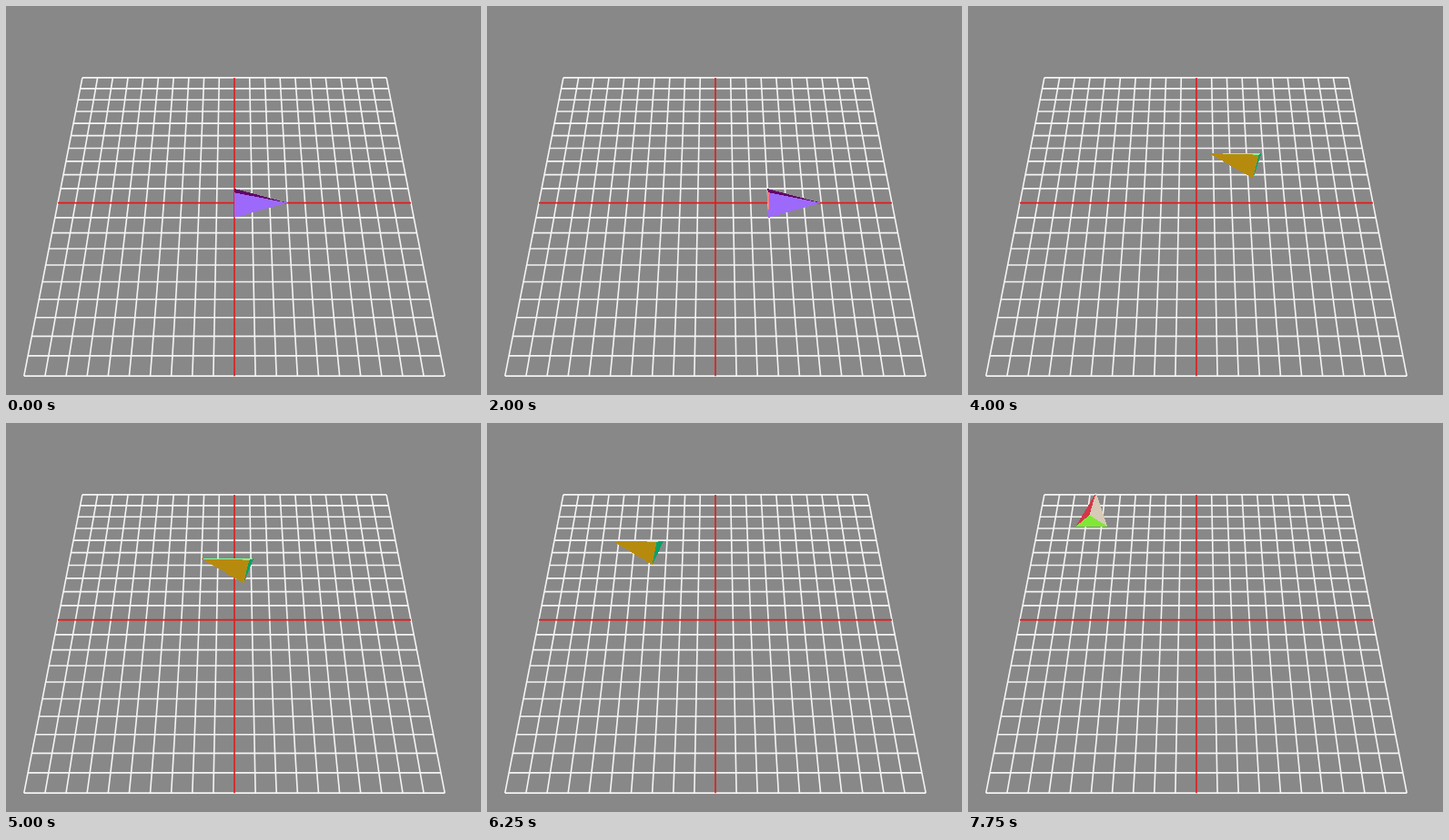
An HTML page that plays this animation: 522x428 px, repeating every 8000 ms.

```html
<!DOCTYPE html>
<html lang="en">
<head>
<meta charset="utf-8">
<title>Arrow on a grid</title>
<style>
  html, body { margin: 0; height: 100%; overflow: hidden; background: #888; }
  svg { display: block; width: 100%; height: 100%; }
  path { fill: none; stroke-width: 1.6; }
  polygon { shape-rendering: crispEdges; }
</style>
</head>
<body>
<svg viewBox="0 0 522 428">
  <path id="grid" stroke="#f4f4f4"/>
  <path id="axes" stroke="#e01c1c"/>
  <g id="arrow"></g>
</svg>
<script>
const LOOP = 8000, STEP = 250, RAD = Math.PI / 180;
const $ = id => document.getElementById(id);

// Camera pitched down at the floor: x right, y up, z towards the viewer.
const SIN = 0.822, COS = 0.57, DIST = 35.4, SCALE = 19.4;
const toView = ([x, y, z]) => [x, y * COS - z * SIN, y * SIN + z * COS];

function project(p) {
  const [x, y, z] = toView(p), k = SCALE / (1 - z / DIST);
  return [251 + x * k, 214 + (0.134 - y) * k];
}

const line = (a, b) => `M${project(a)}L${project(b)}`;
const cross = i => line([i, 0, -10], [i, 0, 10]) + line([-10, 0, i], [10, 0, i]);
let grid = '';
for (let i = -10; i <= 10; i++) if (i) grid += cross(i);
$('grid').setAttribute('d', grid);
$('axes').setAttribute('d', cross(0));

// Steering in degrees per step: left, straight, then right.
const steer = n => n < 7 ? 0 : n < 15 ? 20.25 : n < 26 ? 0 : -18;

// Speeds up on the straight, brakes in the turns.
function poseAt(steps) {
  const parts = 20, dt = 1 / parts;
  let x = 0, z = 0, dir = 0, v = 0;
  for (let i = 0; i < steps * parts; i++) {
    const turn = steer(i / parts) * RAD;
    v = turn ? Math.max(0.48, v - 0.27 * dt) : Math.min(0.92, v + 0.12 * dt);
    const mid = dir + turn * dt / 2;
    x += v * dt * Math.cos(mid);
    z -= v * dt * Math.sin(mid);
    dir += turn * dt;
  }
  return { x, z, dir };
}

// Colour from the face normal as the camera sees it.
function normalColor([a, b, c], sign) {
  const u = b.map((q, i) => q - a[i]), w = c.map((q, i) => q - a[i]);
  const n = [u[1] * w[2] - u[2] * w[1], u[2] * w[0] - u[0] * w[2], u[0] * w[1] - u[1] * w[0]];
  const len = Math.hypot(...n);
  return `rgb(${toView(n).map(q => Math.round(127.5 * (1 + sign * q / len)))})`;
}

const facesCamera = ([a, b, c]) =>
  (b[0] - a[0]) * (c[1] - a[1]) > (b[1] - a[1]) * (c[0] - a[0]);

const polys = [0, 1, 2].map(() => $('arrow').appendChild(
  document.createElementNS('http://www.w3.org/2000/svg', 'polygon')));

function draw(t) {
  const { x, z, dir } = poseAt(Math.max(0, Math.floor(t / STEP) - 1));
  const c = Math.cos(dir), s = Math.sin(dir);
  const tip = [x + 3 * c, 0, z - 3 * s], top = [x, 1, z];
  const left = [x - s, 0, z - c], right = [x + s, 0, z + c];
  // Only the right face has its normal pointing outwards.
  [[tip, left, top], [tip, right, top], [top, right, left]].forEach((face, i) => {
    const outer = i ? face : [tip, top, left];
    const points = outer.map(project);
    polys[i].setAttribute('points', facesCamera(points) ? points.join(' ') : '');
    polys[i].setAttribute('fill', normalColor(outer, i === 1 ? -1 : 1));
  });
}

const start = performance.now();
function frame() {
  draw((performance.now() - start) % LOOP);
  requestAnimationFrame(frame);
}
frame();
</script>
</body>
</html>
```
